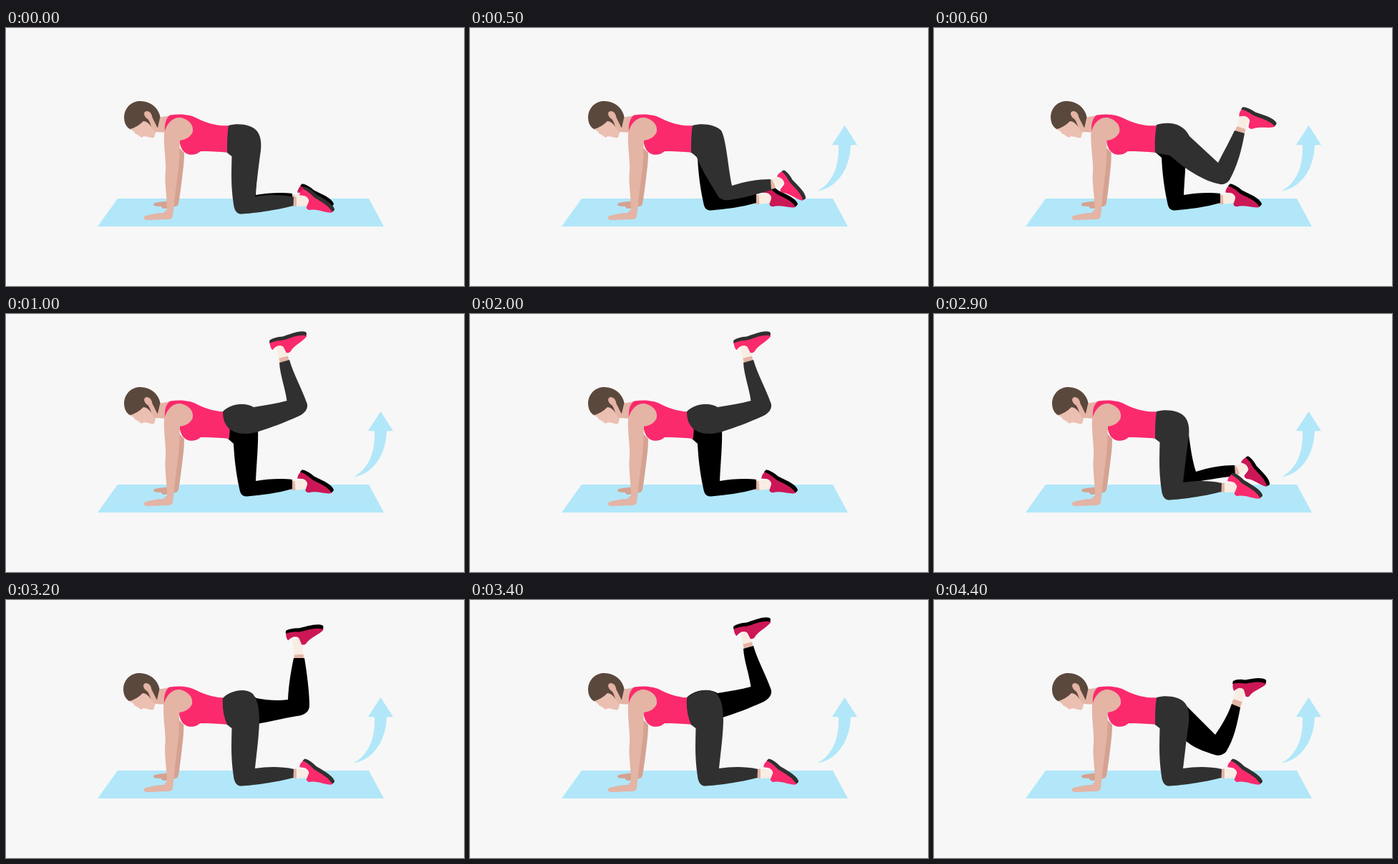
An HTML page for the animation above (4.6 s loop, 640 by 360 pixels).

```html
<!DOCTYPE html>
<html lang="en">
<head>
<meta charset="utf-8">
<title>Kneeling kickback</title>
<style>
  html, body { margin: 0; width: 100%; height: 100%; overflow: hidden; background: #f7f7f7; }
  svg { display: block; width: 100%; height: 100%; }
  .near { --leg: #303030; --shoe: #fb2a6d; }
  .far { --leg: #000; --shoe: #cc1756; }
  .leg, .sole { fill: var(--leg); }
  .upper { fill: var(--shoe); }
  .skin { fill: #e4b4a5; }
  .shade { fill: #d5a292; }
  .hair { fill: #5b483d; }
  .top { fill: #fb2a6d; }
  .blue { fill: #b1e7f9; }
  .ankle { stroke: #e4b4a5; stroke-width: 13; }
  .sock { stroke: #f8ece3; stroke-width: 13; }
</style>
</head>
<body>
<svg viewBox="0 0 640 360" xmlns="http://www.w3.org/2000/svg">
  <path class="blue" d="M156 238H507L528 277H128Z"/>
  <path id="arrow" class="blue" d="M523.5 136L541 163L532 163.500C531 195 515 222 486 227.500C506 216 516 195 515 163.500L506 163Z"/>
  <g id="far" class="far"></g>
  <g id="body">
    <path class="shade" d="M240 165L249 174C249 190 247 200 246 210C244 225 243 235 241 245Q240 249 236 249L222 252Q217 252 217 249L208 248.500Q204 246 208 244Q218 242 232 241L234 200Z"/>
    <path class="skin" d="M205 128L215 124.500Q224 124 231 121L226 146L210 145L205 138Z"/>
    <path fill="#ebc0b2" d="M172 141Q184 138 191 129L204 126L211 139L207 153Q203 154 199 152L192 151Q191 154 188 152L184 149L180 147Q180 144 172 141Z"/>
    <path class="hair" d="M165 124C166 110 176 102 188 102C202 102.500 213 111 215.500 124L212 139C208 137 206 135 205 131L203 138Q198 130 192 130Q183 139 173 141C167 137 165 131 165 124Z"/>
    <path class="skin" d="M193 120C193 115 199 115 202 118.500Q204 121 204.500 125L211 138L209 146L203 138Q201 130 198 127Q194 125 193 120Z"/>
    <path class="top" d="M230 121.500C245 119 257 121 267 126C283 134 298 137.500 314 136L312 174C298 172.500 284 172 272 172C267 176.500 260 178 254 176C247 173 244 168 242 156L222 145C221 134 224 124 230 121.500Z"/>
    <path class="skin" d="M221 147C225 131 235 123 246 125.500C258 129 263 138 260.500 146C257 153 250 156 243 157L242 185C241 200 237 225 235 245L233 263Q232 267 226 267L197 268C192 267 191 264 195 262C203 260 212 258 220 258L225 253C225 235 221 215 223 200C224 185 220 165 221 147Z"/>
  </g>
  <g id="near" class="near"></g>
</svg>
<script>
const LOOP = 4600;
const $ = id => document.getElementById(id);

// Shoe placement, then the line from shin through ankle into the shoe.
const feet = {
  kneel: { shoe: 'translate(417.5 220) rotate(37)', line: [400, 242, 406, 242.3, 424, 242] },
  low: { shoe: 'translate(439 197) rotate(52) scale(.95)', line: [419, 219, 425, 217, 438, 210] },
  mid: { shoe: 'translate(431 109) rotate(25)', line: [427, 146, 429.5, 139, 434, 123] },
  back: { shoe: 'translate(417 112) rotate(-2) scale(.88 1)', line: [421.5, 149, 424.5, 140, 430, 122] },
  high: { shoe: 'translate(390 42) rotate(-8)', line: [409.5, 83, 409, 76, 407, 54] },
  top: { shoe: 'translate(367 36) rotate(-13)', line: [389.5, 67, 387.5, 60, 384, 41] }
};

const shin = 'C365 232.500 385 232 402 236L401.500 248C380 254 350 258 330 259.500C322 260 319 254 318 246C314 220 315 200 315.500 179L309 174';
const high = 'M307 136C318 128 336 126 350 137C366 140 380 141 394 139C395 118 398 100 402 81L417 81C421 105 424 130 424 147C424 156 417 161 406 162C388 165 368 170 350 173C328 176 305 172 306 150Z';
const top_ = 'M303 136C313 126 332 122 346 130C362 127 378 125 392.500 121C390 103 383 85 382 68L396 64C402 85 414 105 421 126C422 133 417 139 408 143C390 151 372 158 350 165C330 170 303 168 303 136Z';

const legs = {
  near: {
    rest: ['kneel', `M311 136C325 132 343 135 350 143C357 151 357.500 163 355 178C352 200 350 220 348 235${shin}C309 160 309 147 311 136Z`],
    stand: ['kneel', `M303 137C313 126 335 122 345 131C352 140 354 152 354 170C353 195 350 215 348 235${shin}C304 162 302 150 303 137Z`],
    low: ['low', 'M311 136C325 132 343 135 351 143C358 155 360 190 366 220C385 214 402 211 420 211L421 226C400 232 380 238 362 240Q350 242 345 232C332 210 322 195 316 178L309 174C309 160 309 147 311 136Z'],
    mid: ['mid', 'M311 135C328 130 348 132 357 151L397 188C405 172 413 158 420 143L434 147C430 170 424 192 413 212Q408 219 400 218C378 214 352 198 330 178L309 174C308 160 309 147 311 135Z'],
    high: ['high', high],
    top: ['top', top_]
  },
  far: {
    rest: ['kneel', 'M307 160L352 160C353 180 350 210 349 233C366 230 385 229 400 231L400 244C380 250 355 253 337 254.500C329 255 327 249 326 243C321 220 319 200 318 181L309 173Z', 'translate(-2 -3) rotate(-5 405 242)'],
    low: ['low', 'M350 150L355 160C358 185 361 205 366 220C385 214 402 211 420 211L421 226C400 228 375 233 352 236L345 236Z'],
    mid: ['back', 'M350 145L357 152L393 188C402 175 411 160 416 145L428 150C424 172 419 195 408 212Q402 218 394 216.500C376 211 362 206 350 195Z'],
    high: ['high', high],
    top: ['top', top_]
  }
};

function foot(name, move = '') {
  const { shoe, line: [a, b, c, d, e, f] } = feet[name];
  return `<g transform="${move}">
    <path class="ankle" d="M${a} ${b}L${c} ${d}"/><path class="sock" d="M${c} ${d}L${e} ${f}"/>
    <g transform="${shoe}">
      <path class="upper" d="M1 3Q-1 10 2 15Q6 12 10 11Q17 11 18 15L20 23Q23 25 26 23C33 15 47 13 53 7L53 2Q25 1 1 3Z"/>
      <path class="sole" d="M0 5L1 1Q8 -2 20 0C30 -1 46 -4 53 1Q54.500 4 52 6C40 1 25 6 18 5Q8 3 0 5Z"/>
    </g></g>`;
}

for (const side in legs) {
  $(side).innerHTML = Object.entries(legs[side]).map(([pose, [shoe, d, move]]) =>
    `<g id="${side}-${pose}">${foot(shoe, move)}<path class="leg" d="${d}"/></g>`).join('');
}

// start, near leg, far leg, arrow, forward lean in pixels
const steps = [
  [0, 'rest', 'rest', 0, 0],
  [500, 'low', 'rest', 1, 0],
  [600, 'mid', 'rest', 1, 2],
  [800, 'high', 'rest', 1, 1],
  [1000, 'top', 'rest', 1, 0],
  [2000, 'top', 'rest', 0, 0],
  [2200, 'mid', 'rest', 0, 2],
  [2400, 'rest', 'rest', 0, 0],
  [2900, 'rest', 'low', 1, 0],
  [3000, 'rest', 'mid', 1, 0],
  [3200, 'stand', 'high', 1, 1],
  [3400, 'stand', 'top', 1, 0],
  [4400, 'rest', 'mid', 1, 0]
];

const show = (el, on) => { el.style.display = on ? '' : 'none'; };

function draw() {
  const t = performance.now() % LOOP;
  const [, near, far, arrow, lean] = steps.findLast(s => s[0] <= t);
  const active = { near, far };
  for (const side in legs)
    for (const pose in legs[side]) show($(`${side}-${pose}`), pose === active[side]);
  show($('arrow'), arrow);
  // shear about the hands, which stay planted
  const k = lean / 145;
  $('body').setAttribute('transform', `matrix(1 0 ${k} 1 ${-k * 267} 0)`);
  requestAnimationFrame(draw);
}
draw();
</script>
</body>
</html>
```
